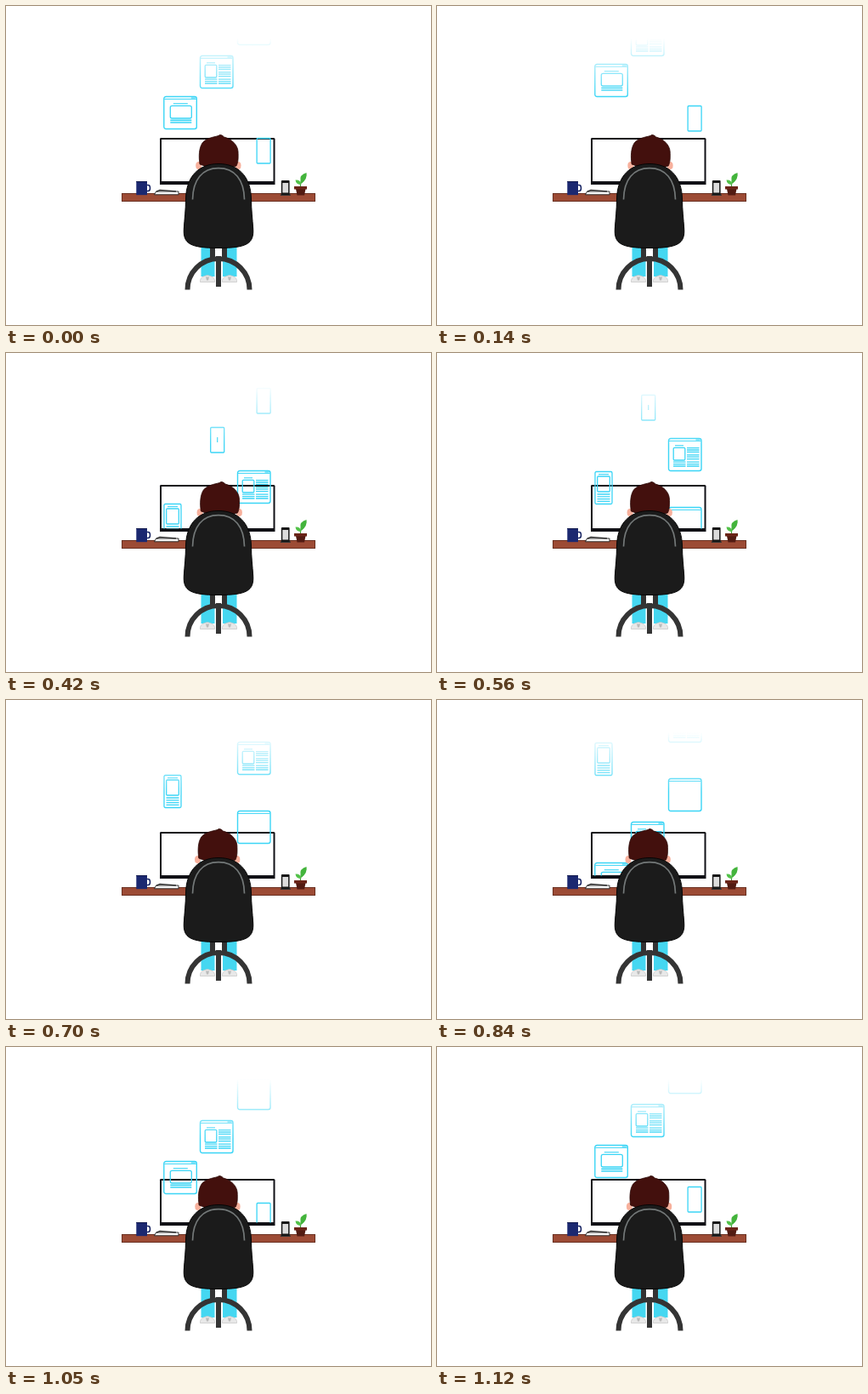
Write an HTML page that moves like this. It is 500 px wide and 375 px high and loops after 1.19 s.

```html
<!DOCTYPE html>
<html lang="en">
<head>
<meta charset="utf-8">
<title>Working at a desk</title>
<style>
  html, body { margin: 0; width: 100%; height: 100%; overflow: hidden; background: #fff; }
  svg { display: block; width: 100vw; height: 100vh; }
</style>
</head>
<body>
<svg viewBox="0 0 500 375">
  <defs>
    <linearGradient id="fade" gradientUnits="userSpaceOnUse" x1="0" y1="38" x2="0" y2="108">
      <stop offset="0" stop-color="#000"/>
      <stop offset="1" stop-color="#fff"/>
    </linearGradient>
    <mask id="sky" maskUnits="userSpaceOnUse" x="170" y="38" width="160" height="168.5">
      <rect x="170" y="38" width="160" height="168.5" fill="url(#fade)"/>
    </mask>
  </defs>

  <!-- monitor -->
  <path d="M182 155H315Q316.500 155 316.500 156.500V210H181V156.500Q181 155 182 155Z" fill="#111116"/>
  <rect x="183" y="157" width="131.500" height="49" fill="#fff"/>

  <g id="cards" mask="url(#sky)" fill="none" stroke="#3bd5f6"></g>

  <!-- desk -->
  <rect x="136.500" y="220.500" width="227" height="9" fill="#9c4b35" stroke="#6a3021"/>

  <!-- mug -->
  <path d="M165 210.500h2.200q2.300 0 2.300 3.500t-2.300 3.500H165" fill="none" stroke="#1b2765" stroke-width="1.600"/>
  <path d="M153.300 206h12.700v16.200h-12.700z" fill="#1b2870"/>
  <path d="M153.300 206.500h12.700" stroke="#10194c"/>

  <!-- notebook and pen -->
  <path d="M174.500 221.800L176.500 218H203V221.800Z" fill="#f5f5f5" stroke="#222" stroke-width=".9"/>
  <path d="M177 218.200L181 216.400L200 217.800" fill="none" stroke="#222" stroke-width="1.300"/>

  <!-- phone on its stand -->
  <path d="M322.500 223L324 220.500H334L335 223Z" fill="#333"/>
  <rect x="323.800" y="205" width="9.800" height="17" rx="1" fill="#161616"/>
  <rect x="325.300" y="208" width="6.800" height="11.500" fill="#dcdcdc"/>

  <!-- plant -->
  <path d="M346.500 213Q346 208 349 202" fill="none" stroke="#3f9a35" stroke-width="1.200"/>
  <path d="M346.500 206Q345 198 353.500 196Q355 203 347.500 209Z" fill="#43b43c"/>
  <path d="M346.500 210Q341 209.500 340.500 204.500Q347 204 347 210Z" fill="#53c249"/>
  <path d="M341 215H352.500L351 222.500H342.500Z" fill="#521b12"/>
  <rect x="339" y="212" width="15" height="3.500" fill="#6a2418"/>

  <!-- legs and shoes -->
  <path d="M229.500 283H245.500V318H229.500ZM255 283H271.500V318H255Z" fill="#45d7f1"/>
  <g fill="#e8e8e8" stroke="#c4c4c4" stroke-width=".7">
    <path id="shoe" d="M228.500 324.500Q228 320 232 318Q237 315 242 318Q246 320 245.500 324.500Z"/>
    <use href="#shoe" x="26"/>
    <path d="M235 318.500h4l-1 4h-2zM261 318.500h4l-1 4h-2z" fill="#bbb" stroke="none"/>
  </g>

  <!-- head -->
  <g id="head">
    <ellipse cx="226.700" cy="187.500" rx="3.500" ry="4.600" fill="#f7b09c"/>
    <ellipse cx="273" cy="187.500" rx="3.500" ry="4.600" fill="#f7b09c"/>
    <path d="M228 186C226.600 177 227 167 231 161C236 155 243 154.500 250 152.500Q251 151 253.500 151.800Q255 152.300 256.500 154C265 156 272.500 163 273 171C273.300 179 273.400 183 271 188Q250 196 228 186Z"
      fill="#43100d" stroke="#2b0907" stroke-width=".8"/>
  </g>

  <!-- chair -->
  <path d="M240 283h6v13h-6zM254 283h6v13h-6z" fill="#333"/>
  <rect x="246" y="284" width="8" height="9.500" fill="#fff"/>
  <path d="M250 294V330M213.500 333.500A36.500 36.500 0 0 1 286.500 333.500" fill="none" stroke="#343434" stroke-width="6"/>
  <path d="M250 185.500C227 185.500 212 200 211.500 227C211.500 240 210 250 209.300 262C208.300 279 216 284.500 250 284.500C284 284.500 291.700 279 290.700 262C290 250 288.500 240 288.500 227C288 200 273 185.500 250 185.500Z"
    fill="#1b1b1b" stroke="#050505"/>
  <path d="M219.500 227.500C220 204 231 190.700 250 190.700C269 190.700 280 204 280.500 227.500" fill="none" stroke="#737878" stroke-width="1.700"/>
</svg>

<script>
const STEP = 70, STEPS = 17, TRAVEL = 326;

const box = (x, y, w, h, r, weight) =>
  `<rect x="${x}" y="${y}" width="${w}" height="${h}" rx="${r}" stroke-width="${weight}"/>`;

// Horizontal text bars of equal width, one for each y
const bars = (x, w, ys, weight = 1.3) =>
  `<path d="${ys.map(y => `M${x} ${y}h${w}`).join("")}" stroke-width="${weight}"/>`;

const browser = box(0.5, 0.5, 38.5, 38, 2.5, 1.4) + bars(1, 37.5, [3.4], 1);
const buttons = bars(32.5, 5, [2], 1.2);

const article = browser + buttons +
  bars(8, 10, [8.8], 1.1) + box(6.2, 11.3, 13.6, 14.7, 1.2, 1.3) +
  bars(22, 14.5, [11.6, 14, 16.4, 19.8, 22.2, 24.6]) +
  bars(6, 14.5, [28.2, 30.6, 33]) + bars(22, 14.5, [28.2, 30.6, 33]);

const banner = browser + buttons +
  bars(11.5, 17, [8.7], 1.1) + box(8, 11.3, 25, 14.7, 2, 1.3) +
  bars(8, 25, [28.3, 31], 1.7);

const post = box(0.5, 0.5, 20, 38, 1.5, 1.3) +
  bars(4.5, 12, [3.6], 1.1) + box(3.2, 6, 14.6, 18, 1, 1.3) +
  bars(3, 15, [27, 29.8, 32.6, 35.4]);

const phone = box(0.5, 0.5, 16, 29.5, 1, 1.3);
const phoneMark = phone + `<path d="M8.500 12v6" stroke-width="1.200"/>`;

// Left edge, top edge at the start of the loop, drawing
const cards = [
  [228, 58, article],
  [185.300, 106, banner],
  [294.600, 155, phone],
  [240.200, 201, phoneMark],
  [272, 252, article],
  [185.500, 291, post],
  [272, 333, browser]
];

const layer = document.getElementById("cards");
const head = document.getElementById("head");
layer.innerHTML = cards.map(card => `<g>${card[2]}</g>`).join("");

// Steady climb with a longer stride in mid-loop
const climb = k => 19 * k + 6.5 * Math.min(2, Math.max(0, k - 8));

function draw(now) {
  const rise = climb(Math.floor(now / STEP) % STEPS);
  cards.forEach(([x, top], i) => {
    const y = (top - rise + 60 + TRAVEL) % TRAVEL - 60;
    layer.children[i].setAttribute("transform", `translate(${x} ${y})`);
  });
  const sway = 1.7 * Math.sin(2 * Math.PI * rise / TRAVEL);
  head.setAttribute("transform", `translate(${sway.toFixed(2)} 0)`);
}

const start = performance.now();
function tick() {
  draw(performance.now() - start);
  requestAnimationFrame(tick);
}
tick();
</script>
</body>
</html>
```
